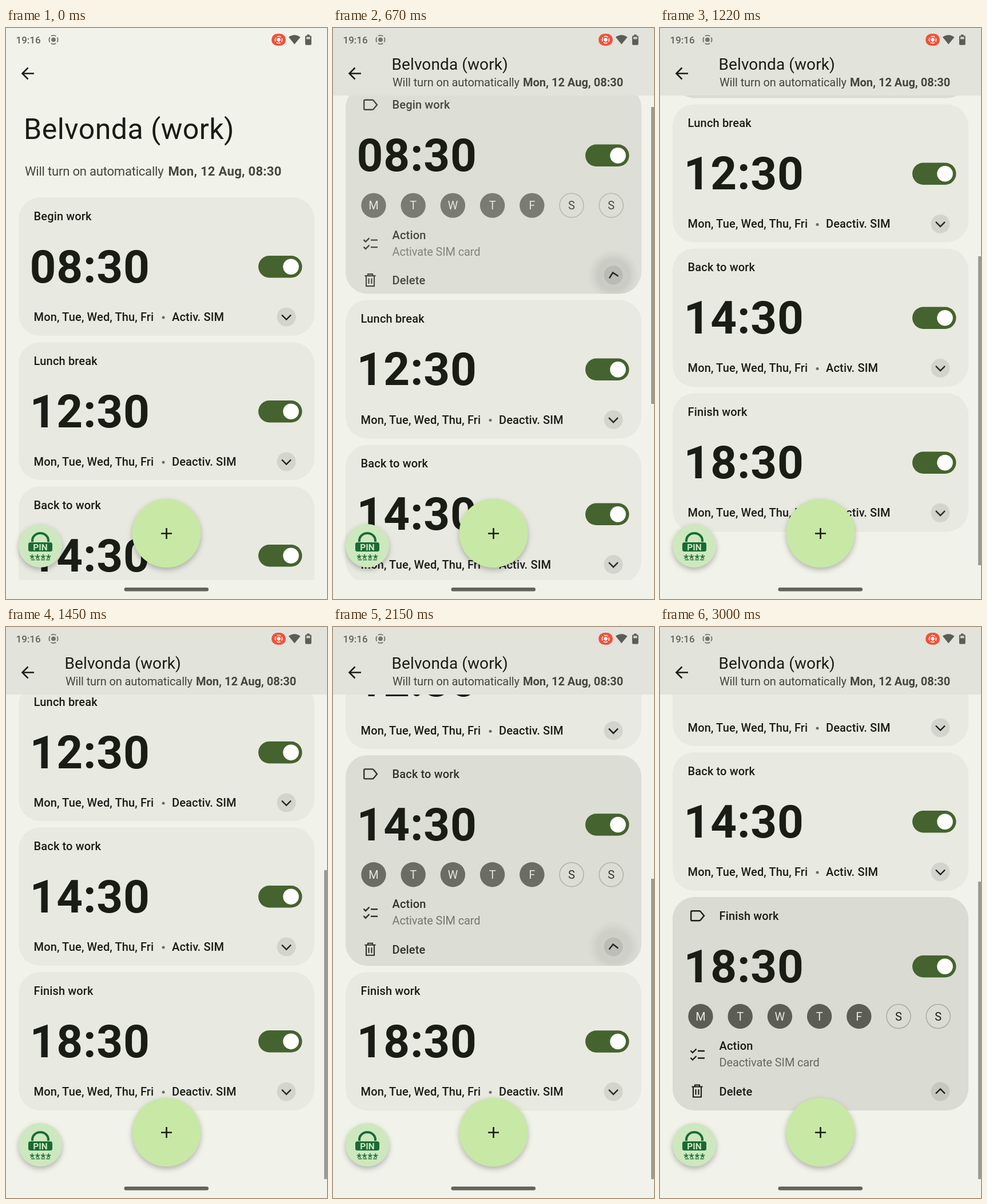
Animation of 561x998 px, one loop 3.15 s. Source, as an HTML page:

```html
<!DOCTYPE html>
<html lang="en">
<head>
<meta charset="utf-8">
<title>SIM schedule</title>
<style>
@property --y { syntax: '<number>'; inherits: true; initial-value: 296; }
@property --p { syntax: '<number>'; inherits: true; initial-value: 0; }
@property --a { syntax: '<number>'; inherits: true; initial-value: 1; }
@property --b { syntax: '<number>'; inherits: true; initial-value: 0; }
@property --h { syntax: '<number>'; inherits: true; initial-value: 519; }

html, body { margin: 0; width: 100%; height: 100%; overflow: hidden; background: #f1f2ea; }
#stage {
  position: absolute; left: 0; top: 0; width: 561px; height: 998px; overflow: hidden;
  background: #f1f2ea; animation: scroll 3150ms linear infinite;
}
svg { position: absolute; left: 0; top: 0; display: block; }
text { font-family: Roboto, 'Noto Sans', sans-serif; font-size: 20px; fill: #1a1c16; }
.m { font-weight: 500; letter-spacing: .15px; }
.mid { text-anchor: middle; }
.soft { fill: #44463f; }
.bold { fill: #44463f; font-weight: 700; }
.line { fill: none; stroke: #1a1c16; stroke-width: 2.4; }

#view { position: absolute; left: 0; top: 0; width: 561px; height: 965px; overflow: hidden; }
#list { position: absolute; left: 22px; top: 0; transform: translateY(calc(var(--y) * 1px)); }
.card {
  position: relative; width: 517px; height: calc(241.7px + 131px * var(--p)); margin-bottom: 11px;
  border-radius: 38px; overflow: hidden; background: #e8e9e1;
}
.time { font-size: 80px; font-weight: 700; letter-spacing: .8px; }
.closed { opacity: var(--a); }
.open { opacity: var(--b); }
.foot { transform: translateY(calc(131px * var(--p))); }
.chev { transform-origin: 490px 209px; transform: rotate(calc(180deg * var(--p))); }
.glow { opacity: 0; transform-box: fill-box; transform-origin: center; }

#big { transform: translateY(calc((var(--y) - 296) * 1px)); opacity: calc(1 - (296 - var(--y)) / 167); }
#small { opacity: calc((152 - var(--y)) / 23); }
#bar {
  position: absolute; left: 555.5px; width: 6px; background: #9a9b94; opacity: 0;
  height: calc(var(--h) * 1px);
  top: calc((max(118, var(--y) - 11) + min(.74 * max(0, 129 - var(--y)), 847 - var(--h))) * 1px);
  animation: bar 3150ms linear infinite;
}
.raised { filter: drop-shadow(0 4px 5px rgba(0, 0, 0, .26)); }
</style>
</head>
<body>
<div id="stage">
  <div id="view"><div id="list"></div></div>
  <div id="bar"></div>
  <svg width="561" height="998" viewBox="0 0 561 998">
    <defs>
      <radialGradient id="shade">
        <stop offset="0" stop-opacity=".22"/>
        <stop offset=".6" stop-opacity=".26"/>
        <stop offset=".8" stop-opacity=".1"/>
        <stop offset="1" stop-opacity="0"/>
      </radialGradient>
      <g id="target">
        <circle r="3.6"/>
        <circle r="7.6" fill="none" stroke-width="1.9" stroke-dasharray="9 2.94" stroke-dashoffset="4.5"/>
      </g>
    </defs>

    <g id="big">
      <text x="31" y="194" style="font-size:50px;letter-spacing:.5px">Belvonda (work)</text>
      <text class="soft" x="33" y="257.5" style="font-size:22px;letter-spacing:-.2px">Will turn on automatically</text>
      <text class="bold" x="283.5" y="257.5" style="font-size:22px;letter-spacing:.3px">Mon, 12 Aug, 08:30</text>
    </g>
    <g id="small">
      <rect width="561" height="118" fill="#e2e3db"/>
      <text x="102.5" y="72.5" style="font-size:28px;letter-spacing:.1px">Belvonda (work)</text>
      <text class="soft" x="104" y="101.5" style="letter-spacing:-.12px">Will turn on automatically</text>
      <text class="bold" x="332" y="101.5">Mon, 12 Aug, 08:30</text>
    </g>
    <path class="line" d="M49 79.500H29M38.500 69.500L28.500 79.500L38.500 89.500" style="stroke-width:2.6"/>

    <text x="17.500" y="27" style="font-size:17px;font-weight:500;fill:#62635c">19:16</text>
    <use href="#target" x="83" y="20.500" fill="#74756e" stroke="#74756e"/>
    <rect x="464" y="10" width="25" height="21" rx="10.500" fill="#f0523a"/>
    <use href="#target" transform="translate(476.500 20.500) scale(.8)" fill="#fff" stroke="#fff"/>
    <path d="M494 16Q504 8.500 514.500 16L504.200 28.500Z" fill="#5c5d56"/>
    <path d="M526 11.500h4.500v2h1.700q1.500 0 1.500 1.500v13q0 1.800-1.800 1.800h-7.200q-1.800 0-1.800-1.800v-13q0-1.500 1.500-1.500h1.600z" fill="#5c5d56"/>
    <rect x="525" y="15.500" width="6.500" height="4" fill="#d3d4cc"/>

    <circle class="raised" cx="280.500" cy="883" r="60" fill="#c8e8a5"/>
    <path class="line" d="M271 883.500h19M280.500 874v19" style="stroke-width:2.6"/>

    <circle class="raised" cx="60" cy="905" r="38" fill="#cde8be"/>
    <path d="M46 898v-2a14 13 0 0 1 28 0v2" fill="none" stroke="#1a6a36" stroke-width="4"/>
    <rect x="39" y="899" width="42" height="16" rx="3.500" fill="#1a6a36"/>
    <text class="mid" x="60" y="912.500" style="font-size:15.500px;font-weight:700;fill:#cde8be">PIN</text>
    <text class="mid" x="60.500" y="932.500" style="font-size:19px;font-weight:700;fill:#1a6a36;letter-spacing:1px">****</text>
    <path d="M44 929.500h33" stroke="#1a6a36" stroke-width="1.600" stroke-dasharray="6.500 2.200"/>

    <rect x="206.500" y="978" width="147.500" height="6.500" rx="3.250" fill="#63645d"/>
  </svg>
</div>
<script>
const LOOP = 3150, GROW = 400;
const EASE = 'animation-timing-function:cubic-bezier(.4,0,.2,1)';
const FLING = 'animation-timing-function:cubic-bezier(.16,1,.3,1)';
const rules = [];

// Stops are [ms, declarations]; the first and last values are held to the loop ends.
function track(name, stops) {
  const all = [[0, stops[0][1]], ...stops, [LOOP, stops[stops.length - 1][1]]];
  rules.push(`@keyframes ${name}{${all.map(([ms, css]) => `${ms / LOOP * 100}%{${css}}`).join('')}}`);
}

// Fade in late and slowly, fade out at once.
const fade = (prop, start, shown) => shown
  ? [[start + GROW / 6, `${prop}:0`], [start + GROW * 5 / 6, `${prop}:1`]]
  : [[start, `${prop}:1`], [start + GROW / 4, `${prop}:0`]];

const LIGHT = 'background-color:#e8e9e1', DARK = 'background-color:#dadbd3';
const tint = (start, open) => open
  ? [[start + GROW / 6, LIGHT], [start + GROW * 5 / 6, DARK]]
  : [[start, DARK], [start + GROW, LIGHT]];

function animateCard(id, moves) {
  track(`size${id}`, moves.flatMap(([t, open]) => [[t, `--p:${1 - open};${EASE}`], [t + GROW, `--p:${open}`]]));
  track(`tint${id}`, moves.flatMap(([t, open]) => tint(t, open)));
  track(`shut${id}`, moves.flatMap(([t, open]) => fade('--a', t, !open)));
  track(`open${id}`, moves.flatMap(([t, open]) => fade('--b', t, open)));
  const t = moves[0][0];
  track(`glow${id}`, [[0, 0, 0], [80, 1, .76], [102, .85, 1], [200, .5, 1.2], [GROW, 0, 1.3]]
    .map(([d, o, s]) => [t + d, `opacity:${o};transform:scale(${s})`]));
  const names = ['size', 'tint', 'shut', 'open'].map(n => `${n}${id} ${LOOP}ms linear infinite`);
  rules.push(`#card${id}{animation:${names}}#card${id} .glow{animation:glow${id} ${LOOP}ms linear infinite}`);
}

const day = (letter, i) => {
  const x = 71 + i * 69.2, work = i < 5;
  return `<circle cx="${x}" cy="208.500" r="${work ? 21.7 : 21}" fill="${work ? '#5c5e55' : 'none'}"
    stroke="${work ? 'none' : '#aaaba3'}" stroke-width="1.500"/>
    <text class="mid" x="${x}" y="215.500" ${work ? 'style="fill:#e8e9e1"' : ''}>${letter}</text>`;
};

const card = ([title, time, verb], i) => `
<div class="card" id="card${i + 1}"><svg width="517" height="373" viewBox="22 0 517 373">
  <text class="time" x="41.500" y="148.500">${time}</text>
  <rect x="441" y="102" width="76.500" height="38.500" rx="19.250" fill="#45632e"/>
  <circle cx="498" cy="121.300" r="13.800" fill="#fff"/>
  <g class="closed">
    <text class="m" x="48.500" y="39.500">${title}</text>
    <text class="m" x="48.500" y="216">Mon, Tue, Wed, Thu, Fri</text>
    <circle cx="275" cy="210" r="2.500" fill="#6b6c65"/>
    <text class="m" x="290" y="216">${verb}. SIM</text>
  </g>
  <g class="open">
    <path class="line" d="M56 24.200h12.500q1.600 0 2.500 1.200l6 7.300-6 7.300q-.9 1.200-2.500 1.200H56q-1.800 0-1.800-1.800V26q0-1.800 1.800-1.800z"/>
    <text class="m" x="103.500" y="39.500">${title}</text>
    ${[...'MTWTFSS'].map(day).join('')}
    <path class="line" d="M66 269h12M66 281.500h12M53.500 268.500l3.500 3.500 6.500-6.500M53.500 281l3.500 3.500 6.500-6.500"/>
    <text class="m" x="103.500" y="267.200">Action</text>
    <text x="103.500" y="296" style="fill:#686a62;letter-spacing:-.15px">${verb}ate SIM card</text>
    <path class="line" d="M55.500 331.500h19M61 331v-2.500h8V331M58 332v17.500h14V332M62.500 336v9.500M67.500 336v9.500" style="stroke-width:2.1"/>
    <text class="m" x="103.500" y="346.500">Delete</text>
  </g>
  <g class="foot">
    <circle cx="490" cy="209" r="16.500" fill="#000" fill-opacity=".09"/>
    <circle class="glow" cx="490" cy="209" r="37" fill="url(#shade)"/>
    <path class="line chev" d="M482 205.500l8 8 8-8"/>
  </g>
</svg></div>`;

document.getElementById('list').innerHTML = [
  ['Begin work', '08:30', 'Activ'],
  ['Lunch break', '12:30', 'Deactiv'],
  ['Back to work', '14:30', 'Activ'],
  ['Finish work', '18:30', 'Deactiv']
].map(card).join('');

track('scroll', [
  [334, `--y:296;${EASE}`], [814, '--y:89'],
  [1080, `--y:89;${FLING}`], [1498, '--y:-286'],
  [1850, `--y:-286;${EASE}`], [2250, '--y:-417']
]);
track('bar', [
  [350, 'opacity:0;--h:519'], [390, 'opacity:1;--h:519'], [1120, 'opacity:1;--h:519'],
  [1220, 'opacity:1;--h:540'], [1590, 'opacity:1;--h:540'], [1740, 'opacity:0;--h:540'],
  [1850, 'opacity:0;--h:540'], [1890, 'opacity:1;--h:538'], [2250, 'opacity:1;--h:520']
]);
animateCard(1, [[400, 1]]);
animateCard(3, [[1850, 1], [2500, 0]]);
animateCard(4, [[2500, 1]]);

const sheet = document.createElement('style');
sheet.textContent = rules.join('\n');
document.head.append(sheet);
</script>
</body>
</html>
```
